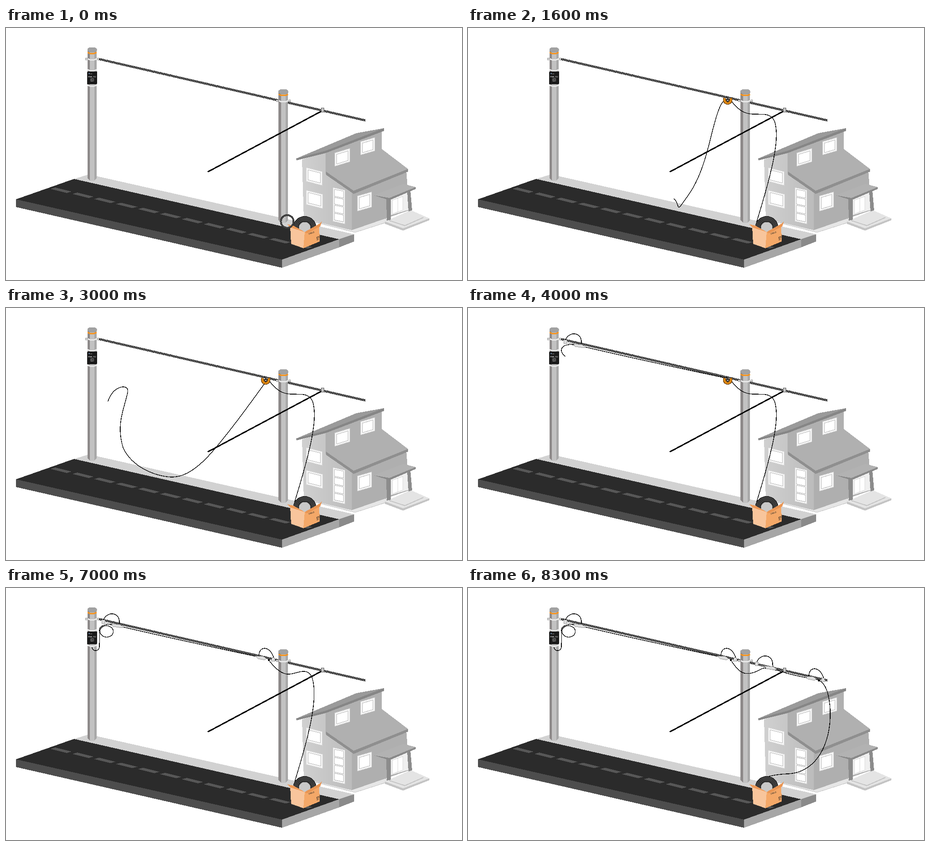
An HTML page for the animation above (10000 ms loop, 1006 px wide and 556 px high).

```html
<!DOCTYPE html>
<html lang="en">
<head>
<meta charset="utf-8">
<title>Aerial cable run</title>
<style>
  html, body { margin: 0; width: 100%; height: 100%; overflow: hidden; background: #fff; }
  svg { display: block; width: 1006px; height: 556px; shape-rendering: crispEdges; }
  text { font-family: "DejaVu Sans Mono", monospace; font-weight: bold; }
  .wire { fill: none; stroke: #000; stroke-width: 1.4; stroke-linejoin: round; }
  .frame { fill: #f6f6f6; stroke: #dadada; }
  .glass { fill: #fff; stroke: #b8b8b8; }
  .fitting { fill: #ddd; stroke: #888; stroke-width: .8; }
  .band { fill: none; stroke: #e8e8e8; stroke-width: 3; }
</style>
</head>
<body>
<svg viewBox="0 0 1006 556">
  <defs>
    <pattern id="twist" width="3" height="3" patternUnits="userSpaceOnUse" patternTransform="rotate(35)">
      <rect width="3" height="3"/>
      <rect width=".8" height="3" fill="#eee"/>
    </pattern>
    <linearGradient id="wall">
      <stop stop-color="#d0d0d0"/>
      <stop offset="1" stop-color="#bcbcbc"/>
    </linearGradient>
    <g id="pole">
      <path fill="#c2c2c2" d="M180 48H200V331L195 337H185L180 331Z"/>
      <path fill="#8d8989" d="M180 48L185 52V337L180 331Z"/>
      <path fill="#a8a8a8" d="M200 48L195 52V337L200 331Z"/>
      <path fill="#a2a2a2" stroke="#8e8e8e" stroke-width=".6" d="M180 46L184 43H196L200 46V50L196 53H184L180 50Z"/>
      <path fill="none" stroke="#f7941d" stroke-width="3" d="M180 54L185 56H195L200 54"/>
      <path class="band" d="M180 68L185 70H195L200 68"/>
      <path class="fitting" d="M175 66h4v4h-4zM201 66h4v4h-4z"/>
    </g>
    <g id="clampL">
      <path class="wire" d="M214 76C217 51 251 50 250 76Q250 81 256 85"/>
      <path class="fitting" d="M217 77L252 81L259 86L256 88L236 85L234 80Z"/>
      <path class="fitting" d="M212 70L219 71L217 79L211 78Z"/>
    </g>
    <g id="clampR">
      <path class="wire" d="M558 151C557 126 585 126 592 159"/>
      <path class="fitting" d="M550 150L567 151L574 155L571 159L556 156Z"/>
      <path class="fitting" d="M587 153L592 154L594 162L585 161Z"/>
      <path d="M578 157h4v4h-4z"/>
    </g>
  </defs>

  <!-- road -->
  <path fill="#d2d2d2" d="M150 333L183 323L768 455L735 466Z"/>
  <path fill="#2b2b2b" d="M150 333L22 378L609 511L735 466Z"/>
  <path fill="#4d4d4d" d="M22 378L609 511V529L22 395Z"/>
  <path fill="#a6a6a6" d="M609 511L735 466V484L609 529Z"/>
  <path fill="#8a8a8a" d="M735 466L768 455V471L735 484Z"/>
  <g id="lane" fill="#575757"></g>

  <!-- house -->
  <path fill="#e6e6e6" stroke="#c4c4c4" d="M680 428L770 451L842 428L838 420L762 440Z"/>
  <path fill="url(#wall)" d="M653 290L705 274V320L763 360V446L657 421Z"/>
  <path fill="#b0b0b0" d="M705 275L829 227V268L705 322Z"/>
  <path fill="#afafaf" d="M763 360L883 314L890 402L763 446Z"/>
  <path fill="#9a9a9a" d="M640 288L773 232L834 221V226L705 275L641 292Z"/>
  <path fill="#868686" d="M640 288L705 271L834 221V227L705 276L641 292Z"/>
  <path fill="#b0b0b0" d="M706 317L829 267L887 311L767 359Z"/>
  <path fill="#8f8f8f" d="M706 317L767 359L887 311V317L767 366L706 324Z"/>
  <path fill="#efefef" d="M848 379L886 361L889 401L848 413Z"/>
  <path fill="#fff" stroke="#d8d8d8" d="M852 380L875 372V402L852 410ZM864 376V406"/>
  <path fill="#c4c4c4" d="M836 427L893 402L934 420V424L876 447L836 432Z"/>
  <path fill="#e4e4e4" d="M836 427L893 402L934 420L876 442Z"/>
  <path fill="none" stroke="#c4c4c4" stroke-width="2" d="M846 425L880 436L921 418"/>
  <path fill="#8c8c8c" d="M839 375L849 373V423L840 425ZM885 360L892 357L896 402L888 405Z"/>
  <path fill="#b2b2b2" d="M811 369L877 344L904 351L846 375Z"/>
  <path fill="#898989" d="M811 369L846 375L904 351V355L846 380Z"/>
  <g id="windows"></g>

  <!-- strand and poles -->
  <path fill="url(#twist)" d="M203 65.5L793 201.500V206.500L203 70.500Z"/>
  <use href="#pole"/>
  <use href="#pole" transform="translate(412.500 92.500) scale(1.05 1)"/>
  <path class="band" d="M180 92L185 94H195L200 92M180 126L185 128H195L200 126"/>
  <rect x="179" y="96" width="22" height="28" rx="2" fill="#191919"/>
  <circle cx="183.500" cy="100.500" r="1.300" fill="#7d9cc8"/>
  <g fill="#ddd" font-size="3.600" text-anchor="middle">
    <text x="188" y="101.500" font-size="2.500">ooo</text>
    <text x="190" y="109">PMWD_TC2</text>
    <text x="190" y="113.500">LOT2</text>
    <text x="190" y="117.500">TAST</text>
  </g>
  <path stroke="#000" stroke-width="3" d="M445 317.500L697 183"/>
  <rect x="695.500" y="176" width="6" height="9" fill="#c4c4c4" stroke="#555"/>

  <!-- moving parts -->
  <path id="span" class="wire"/>
  <path id="tail" class="wire"/>
  <path id="feed" class="wire"/>
  <g id="hook" fill="none">
    <path stroke="#5c3506" stroke-width="7" d="M567 155A7 7 0 1 0 579 155"/>
    <path stroke="#df8812" stroke-width="4.500" d="M567 155A7 7 0 1 0 579 155"/>
    <path stroke="#222" stroke-width="1.500" d="M570 152L573 157L577 152M570 158L573 163L576 158Z"/>
  </g>
  <use id="left" href="#clampL"/>
  <use id="right" href="#clampR"/>
  <g id="far">
    <use href="#clampL" x="422" y="93"/>
    <use href="#clampR" x="194" y="45"/>
  </g>

  <!-- carton with reel -->
  <circle cx="659" cy="441" r="26" fill="#2c2c2c"/>
  <g fill="none" stroke="#686868" stroke-width=".8">
    <circle cx="659" cy="441" r="23"/><circle cx="659" cy="441" r="20"/><circle cx="659" cy="441" r="17"/>
  </g>
  <circle cx="659" cy="441" r="13" fill="#c9c9c9" stroke="#777"/>
  <path fill="#f8c59c" d="M627 438L659 450L656 486L629 476Z"/>
  <path fill="#f4a868" d="M659 450L691 434L692 471L656 486Z"/>
  <path fill="#ee9a58" d="M621 433L634 436L659 450L627 440Z"/>
  <path fill="#e99553" d="M659 450L691 432L697 427L693 438L664 453Z"/>
  <text transform="translate(668 456) rotate(-20)" font-size="4.500" fill="#543">CABLE</text>
  <path fill="none" stroke="#5a4330" d="M685 462l5-2v3l-5 2zM685 468l5-2"/>
  <g id="ring" fill="none">
    <circle r="14" stroke="#333" stroke-width="4"/>
    <circle r="14" stroke="#666" stroke-width=".7"/>
  </g>
</svg>
<script>
const $ = id => document.getElementById(id);
const SAMPLES = 200;

$("lane").innerHTML = Array.from({ length: 12 }, (_, i) =>
  `<path d="M${98 + 48.3 * i} ${355 + 11.15 * i}l11-3 36 9-11 3z"/>`).join("");

// skewed rectangle: the right side sits k lower than the left
const quad = (x, y, w, h, k, cls) => `<path class="${cls}" d="M${x} ${y}l${w} ${k}v${h}l${-w} ${-k}z"/>`;
const pane = (x, y, w, h, k) =>
  quad(x, y, w, h, k, "frame") + quad(x + 4, y + 4 + k * .1, w - 8, h - 8, k * .75, "glass");
$("windows").innerHTML =
  pane(662, 308, 35, 30, 9) + pane(662, 358, 36, 31, 9) +
  pane(725, 276, 33, 29, -10) + pane(782, 251, 31, 29, -9) + pane(775, 371, 31, 33, -9) +
  quad(721, 352, 26, 74, 6, "frame") +
  [0, 1, 2, 3].map(i => quad(724, 356 + 17.5 * i, 20, 15, 4, "glass")).join("");

// evenly spaced points along a path, so that any two curves can blend
function sample(d) {
  const path = document.createElementNS("http://www.w3.org/2000/svg", "path");
  path.setAttribute("d", d);
  const len = path.getTotalLength();
  return Array.from({ length: SAMPLES + 1 }, (_, i) => path.getPointAtLength(len * i / SAMPLES));
}

const prog = (t, from, to) => Math.max(0, Math.min(1, (t - from) / (to - from)));
const mix = (a, b, k) => a.map((p, i) => ({ x: p.x + (b[i].x - p.x) * k, y: p.y + (b[i].y - p.y) * k }));
const cut = (line, part) => line.slice(0, Math.max(2, Math.round(part * SAMPLES) + 1));
const keys = list => list.map(([time, d]) => ({ time, line: sample(d) }));

function blend(poses, t) {
  const i = poses.findIndex(p => p.time > t);
  if (i < 0) return poses[poses.length - 1].line;
  const a = poses[i - 1], b = poses[i];
  return mix(a.line, b.line, prog(t, a.time, b.time));
}

const drop = "C692 250 660 350 635 434";
const hung = "M580 160C596 180 608 190 632 190C650 191 667 187 676 205" + drop;
const feed = keys([
  [1500, hung],
  [6900, hung],
  [7000, "M582 162C596 180 610 190 622 190C640 191 664 172 675 197" + drop],
  [8300, "M582 162C600 190 612 190 624 188C640 185 648 175 656 177L684 182Q715 193 770 202C796 208 800 260 799 285C797 350 765 408 705 410Q680 411 658 417"]
]);
const span = keys([
  [1500, "M569 158C545 165 530 300 503 365S490 392 478 381"],
  [2200, "M568 158C548 164 538 225 521 272C505 330 465 373 418 373C380 372 345 358 312 351"],
  [2500, "M569 158C550 168 540 225 523 268C500 330 450 384 400 382C340 374 290 350 240 338"],
  [3000, "M573 163Q505 258 463 308C430 347 400 373 365 373C325 371 275 348 258 307C245 262 256 235 265 200C269 185 273 174 258 174C243 175 231 188 225 206"],
  [3600, "M571 155Q400 119 258 86L232 81C206 78 198 95 215 107"]
]);
const tail = sample("M215 107C228 112 240 102 236 92C232 82 212 78 207 94L206 128C206 142 190 140 190 131");
const toss = sample("M635 434C660 350 700 245 674 199C660 182 630 195 600 223C575 246 545 280 527 305Q503 341 478 381");

const draw = (id, line) =>
  $(id).setAttribute("d", "M" + line.map(p => p.x.toFixed(2) + " " + p.y.toFixed(2)).join("L"));
const show = (id, on) => $(id).setAttribute("visibility", on ? "visible" : "hidden");

// the ring rides on the inner side of the cable's tip
function placeRing(line) {
  const [a, b] = line.slice(-2);
  const dx = b.x - a.x, dy = b.y - a.y, r = 16 / Math.hypot(dx, dy);
  $("ring").setAttribute("transform", `translate(${b.x + dy * r} ${b.y - dx * r})`);
}

function render(t) {
  const tossing = t < 1500;
  show("ring", tossing);
  show("span", !tossing);
  show("hook", !tossing && t < 5500);
  show("left", t >= 3700);
  show("tail", t > 4000);
  show("right", t >= 5500);
  show("far", t >= 8100);

  if (tossing) {
    const line = cut(toss, Math.pow(prog(t, 0, 1000), .83));
    draw("feed", line);
    placeRing(line);
  } else {
    draw("feed", blend(feed, t));
    draw("span", blend(span, t));
    draw("tail", cut(tail, (prog(t, 4000, 4700) + prog(t, 4700, 5000)) / 2));
  }
}

const start = performance.now();
function tick() {
  const t = (performance.now() - start) % 10000;
  render(Math.floor(t / 100) * 100);
  requestAnimationFrame(tick);
}
tick();
</script>
</body>
</html>
```
